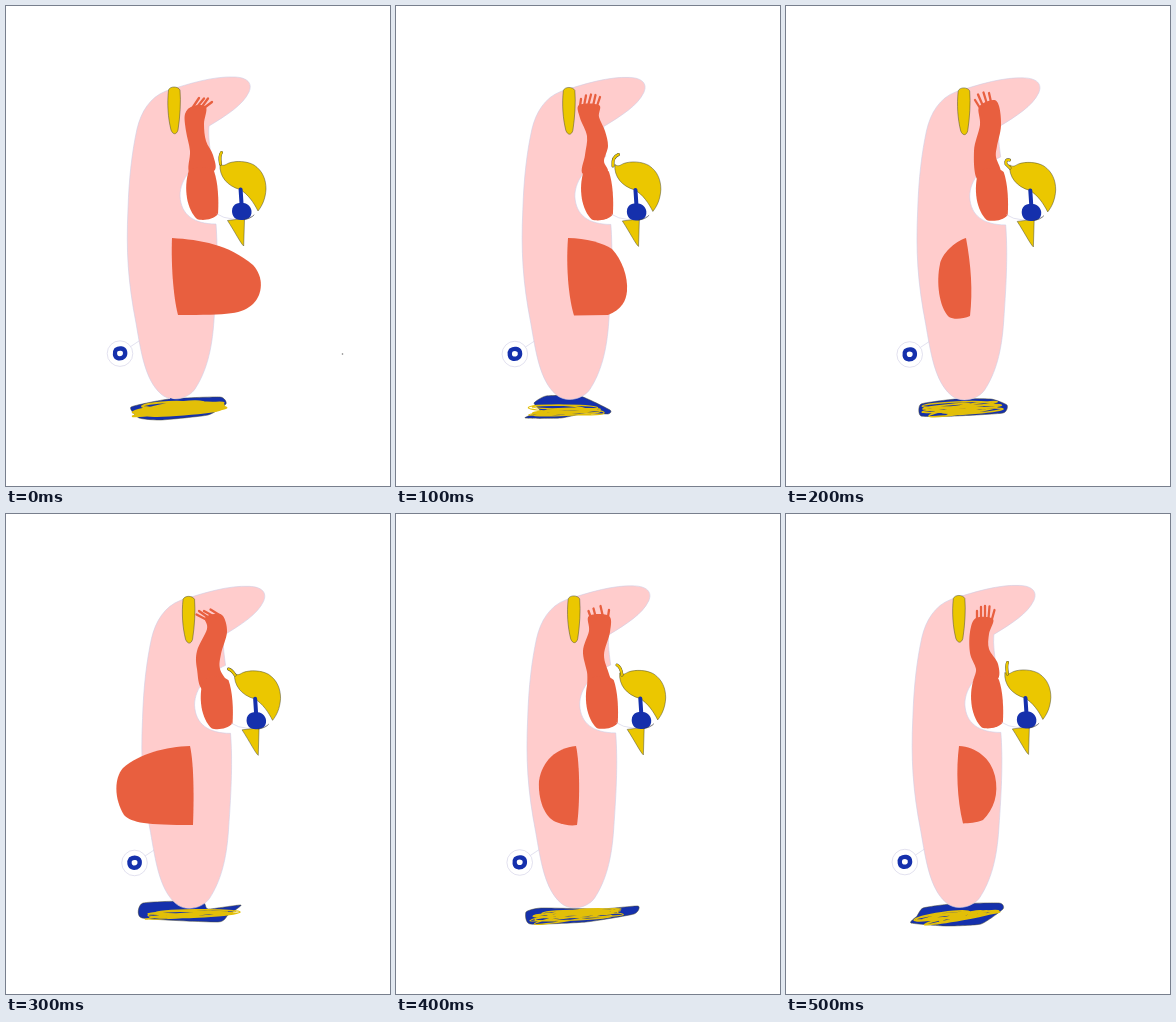
An HTML page that plays this animation: 384 px wide and 480 px high, repeating every 0.6 s.

```html
<!DOCTYPE html>
<html lang="en">
<head>
<meta charset="utf-8">
<title>Swaying figure</title>
<style>
  html, body { margin: 0; width: 100%; height: 100%; overflow: hidden; background: #fff; }
  svg { display: block; width: 100vw; height: 100vh; }
  .pink { fill: #ffcccc; }
  .red { fill: #e85f3f; }
  .yellow { fill: #ebc700; }
  .blue { fill: #1530ac; }
  .line { fill: none; stroke-linecap: round; stroke-linejoin: round; }
  .faint { stroke: #cfcde4; stroke-width: .6; }
  .edge { stroke: #4b4a32; stroke-width: .5; }
</style>
</head>
<body>
<svg viewBox="0 0 384 480" preserveAspectRatio="xMidYMid meet">
  <path id="nest" class="blue edge"/>
  <g class="sway">
    <path class="line faint" d="M124 341L133 335"/>
    <circle class="faint" cx="114" cy="347.6" r="12.8" fill="#fff"/>
    <path class="line" stroke="#1530ac" stroke-width="4.4" d="M110 343.8C113 341.7 118 342 119 345.5C120 350 117 352.8 112.5 352.3C108.3 351.6 108.2 346 110 343.8Z"/>
    <path class="pink faint" d="M160 85C185 77 208 70 229 71C241 71.5 247 77 243 86C237 99 221 109 203 120C202 130 204 142 205 150C188 158 174 172 174 190C175 209 188 218 210 218C212 245 211 272 208 314C206 345 200 366 189 383C182 393 165 397 155 388C139 374 135 346 130 317C122 276 120 245 122 203C123 171 126 146 131 123C135 106 144 91 160 85Z"/>
    <path class="yellow edge" d="M162.5 84C164 80 172 80 174 84C175 96 174 111 172 124C170.500 129 167 129 165 124C162 112 161 98 162.500 84Z"/>
  </g>
  <path id="mark" class="blue" d="M164 392Q173 396 181 392L180 396Q172 397 165 396Z"/>
  <path id="strands" class="line" stroke="#e2bf08"/>
  <path id="skirt" class="red"/>
  <path id="forearm" class="red"/>
  <path id="fingers" class="line" stroke="#e85f3f" stroke-width="2.3"/>
  <g class="sway">
    <path class="red" d="M183 164C190 160 203 160 208 165C212 176 213 194 212 208C207 214 196 215 191 213C181 204 177 182 183 164Z"/>
    <path class="line faint" d="M211 208Q224 217 247 210"/>
    <path class="yellow edge" d="M221.500 214.500L238.500 212.500L237.700 240C235 238 229 226 221.500 214.500Z"/>
    <path class="yellow edge" d="M214 158C218 161 220 158 223 157C230 154.500 241 155 248 159C257 165 260 174 260 183C259.500 193 256 200 252 205C248 197 242 188 234 183.500C221 180 213 170 214 158Z"/>
    <path class="line" stroke="#1530ac" stroke-width="4" stroke-linecap="butt" d="M234.600 183.500L235.600 199"/>
    <path class="blue" d="M231 197.500C238 195 245 199 245.500 205C246 212 241 214 235 214C229 214 226 210 226 205C226 201 228 198.500 231 197.500Z"/>
    <path class="line" stroke="#333" stroke-width=".6" d="M238 213.700Q245 212.500 248 209"/>
  </g>
  <path id="stemEdge" class="line" stroke="#4b4a32" stroke-width="3"/>
  <path id="stem" class="line" stroke="#ebc700" stroke-width="2.200"/>
  <circle id="speck" cx="336.500" cy="348" r=".8" fill="#777"/>
</svg>
<script>
const STEP = 100;
const $ = id => document.getElementById(id);
const swaying = document.querySelectorAll('.sway');

// Each pose: skirt, forearm outline, fingers (base to tip), cap stem, nest and its strands.
const poses = [
  {
    skirt: 'M166 232C195 234 222 238 247 259C258 271 257 288 247 298C236 308 224 309 172 309C167 290 165 256 166 232Z',
    arm: '187 100 179 108 180 125 184 145 184 167 208 165 207 149 200 135 198 118 200 101',
    fingers: 'M187 101L193 92M191 101L198 92.500M195 102L202 92.500M198 102L206 96',
    stem: 'M215.500 146.500Q213 150 214.500 158',
    nest: '125 401 163 393 214 391 220 398 202 409 155 414 133 412',
    strands: [174, 402.500, 48, 8, -5, 13, 2.1]
  }, {
    skirt: 'M172 232C190 232 207 237 216 243C226 254 232 270 231 285C230 295 226 303 212 309L178 309.500C172 290 170 258 172 232Z',
    arm: '183 99 184 112 191 130 189 149 187 168 211 166 208 155 212 140 209 125 203 111 203 99',
    fingers: 'M184 100L185 93M188 100L190 89.500M192 100L195 88.500M197 100L199.500 89M201 100L204 91',
    stem: 'M222.500 148.500Q216 151 217 160',
    nest: '138 397 150 390 184 390 214 404 212 408 190 407 165 412 129 412 144 405',
    strands: [171, 404, 40, 7, 0, 8, 1.2]
  }, {
    skirt: 'M180 232C168 236 156 248 154 258C150 276 153 301 163 311C168 314 177 313 184 310C187 285 185 259 180 232Z',
    arm: '193 101 194 119 188 145 192 174 214 168 210 151 211 140 215 120 213 100 207 94',
    fingers: 'M194 102L189 94M197 100L192 88.500M201 98L197.500 86.500M205 96L203 87',
    stem: 'M223.500 154Q219 153 220 158L224 162',
    nest: '135 398 170 393 205 393 221 399 217 407 170 410 135 410',
    strands: [177, 402, 41, 7, -5, 9, 1.6]
  }, {
    skirt: 'M184 232C160 233 134 239 117 254C108 264 108 285 118 301C126 309 140 311 187 311C188 285 188 250 184 232Z',
    arm: '199 104 201 115 191 137 191 155 197 176 222 173 214 155 215 140 221 118 217 102 208 100',
    fingers: 'M201 106L190.500 100.500M203 104L193 97M209 103L198 97M215 102L204.500 95.500',
    stem: 'M222.500 155Q226 156 229 161',
    nest: '137 389 195 387 202 395 235 391 222 401 212 408 136 404',
    strands: [186, 400, 49, 6, -5, 7, 1.4]
  }, {
    skirt: 'M180 232C160 234 146 247 143 267C142 285 148 303 160 308C168 311 175 312 181 311C184 290 184 250 180 232Z',
    arm: '193 102 193 117 187 137 191 158 194 176 216 173 213 160 208 141 214 118 213 102',
    fingers: 'M195 104L192.500 97M200 104L197.500 94.500M207 103L204.500 92M212 103L213 96',
    stem: 'M221 151Q225 153 226 161',
    nest: '130 398 145 394 205 395 242 392 238 400 190 408 134 410',
    strands: [186, 401, 54, 6, -5, 9, 1.3]
  }, {
    skirt: 'M173 232C190 233 205 244 209 262C213 280 208 295 197 306C190 309 183 309 177 309.500C171 285 170 255 173 232Z',
    arm: '190 104 184 118 184 139 190 155 189 168 211 166 212 150 203 135 203 120 207 105',
    fingers: 'M191 105L191 97M195 104L195 93M199 104L199 92M202.500 104L203.500 92.500M206 105L208.500 96',
    stem: 'M221.500 148.500Q220 152 221.500 160',
    nest: '131 402 137 394 165 390 213 389 217 395 195 410 160 412 125 409',
    strands: [170, 402, 45, 6, -9, 7, 1.6]
  }
];

function random(seed) {
  return () => (seed = (seed * 16807) % 2147483647) / 2147483647;
}

// Closed smooth curve through a list of points.
function smooth(text, tension = 6) {
  const n = text.split(' ').map(Number);
  const count = n.length / 2;
  const at = i => { const k = (i + count) % count * 2; return [n[k], n[k + 1]]; };
  let d = 'M' + at(0);
  for (let i = 0; i < count; i++) {
    const [a, b, c, e] = [at(i - 1), at(i), at(i + 1), at(i + 2)];
    const p = b.map((v, k) => v + (c[k] - a[k]) / tension);
    const q = c.map((v, k) => v - (e[k] - b[k]) / tension);
    d += `C${p} ${q} ${c}`;
  }
  return d + 'Z';
}

// Loose flat loops wound around the nest.
function scribble([cx, cy, w, h, tilt, loops], seed) {
  const rnd = random(seed);
  let d = '';
  for (let i = 0; i < loops; i++) {
    const rx = w * (.55 + .35 * rnd());
    const ry = h * (.2 + .4 * rnd());
    const x = cx + (rnd() - .5) * 2 * (w - rx);
    const y = cy + (rnd() - .5) * h;
    const angle = tilt + (rnd() - .5) * 9;
    const a = angle * Math.PI / 180;
    const dx = rx * Math.cos(a), dy = rx * Math.sin(a);
    d += `M${x - dx} ${y - dy}A${rx} ${ry} ${angle} 1 1 ${x + dx} ${y + dy}`;
    d += `A${rx} ${ry * .7} ${angle} 0 1 ${x - dx} ${y - dy}`;
  }
  return d;
}

function draw(time) {
  const i = Math.floor(time / STEP) % poses.length;
  const pose = poses[i];
  const lean = 3 - Math.abs(3 - i);
  swaying.forEach(g => g.setAttribute('transform', `translate(${lean * 4.85} ${lean * .45})`));
  const set = (id, d) => $(id).setAttribute('d', d);
  set('skirt', pose.skirt);
  set('forearm', smooth(pose.arm));
  set('fingers', pose.fingers);
  set('stem', pose.stem);
  set('stemEdge', pose.stem);
  set('nest', smooth(pose.nest, 12));
  set('strands', scribble(pose.strands, 711 + i * 97));
  $('strands').setAttribute('stroke-width', pose.strands[6]);
  for (const id of ['speck', 'mark']) $(id).style.display = i ? 'none' : '';
}

const start = performance.now();
function tick() {
  draw(performance.now() - start);
  requestAnimationFrame(tick);
}
tick();
</script>
</body>
</html>
```
